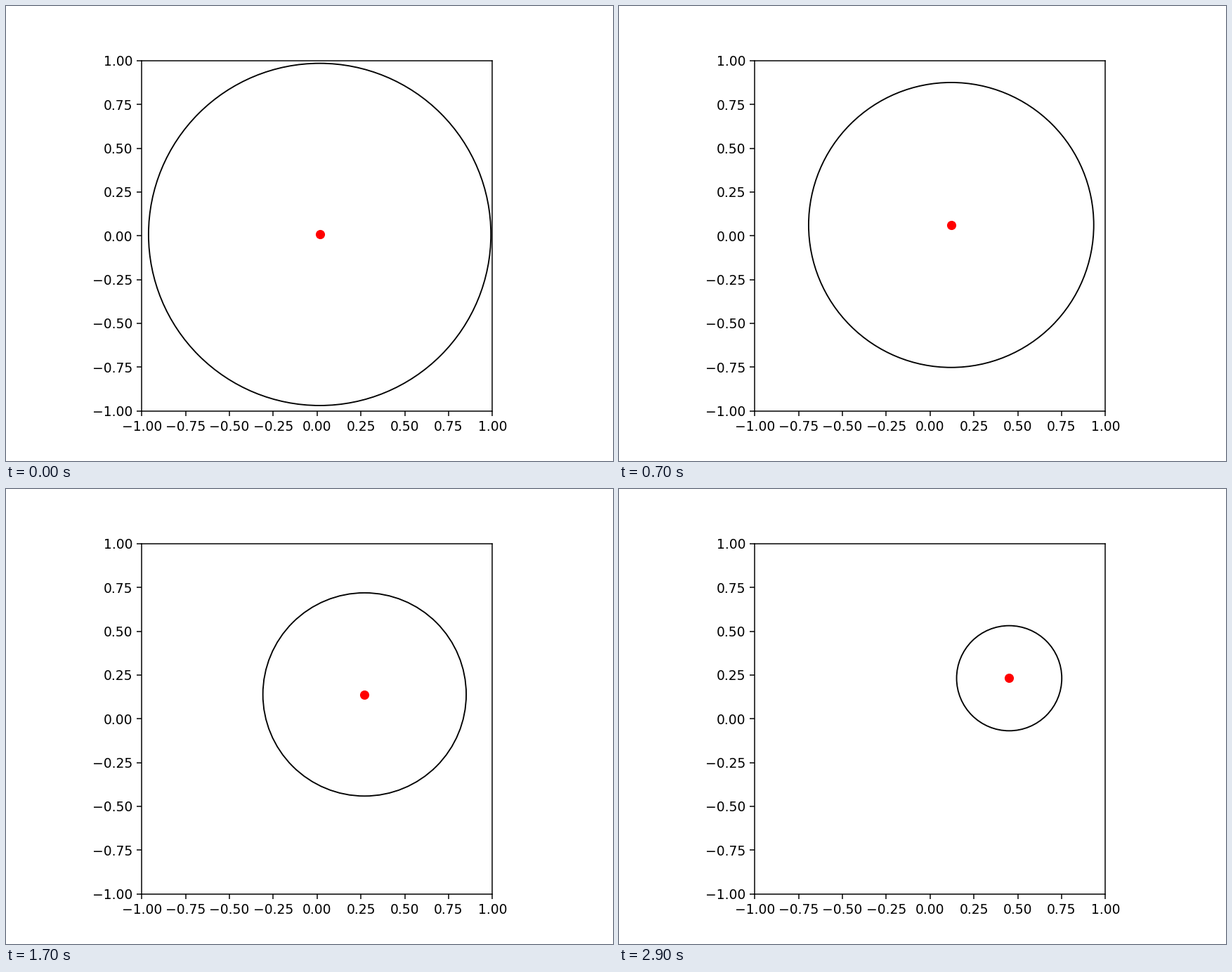
Recreate the animation shown at these times as a matplotlib script. Size 864 by 648 pixels, loop 3 s.

```python
import matplotlib.pyplot as plt
from matplotlib.animation import FuncAnimation
from matplotlib.patches import Circle

FRAMES = 30
INTERVAL = 100
END_X, END_Y = 0.4513, 0.2315
END_RADIUS = 0.3

fig, ax = plt.subplots(figsize=(6.4, 4.8), dpi=135)
ax.set_xlim(-1, 1)
ax.set_ylim(-1, 1)
ax.set_aspect("equal")

ring = ax.add_patch(Circle((0, 0), 1, fill=False, edgecolor="black", linewidth=1))
dot, = ax.plot([], [], "ro")


def update(frame):
    """Shrink the unit circle linearly towards its end position."""
    t = (frame + 1) / FRAMES
    x, y = END_X * t, END_Y * t
    ring.set_center((x, y))
    ring.set_radius(1 + (END_RADIUS - 1) * t)
    dot.set_data([x], [y])
    return ring, dot


anim = FuncAnimation(fig, update, frames=FRAMES, interval=INTERVAL,
                     init_func=lambda: update(0), repeat=True, repeat_delay=0)

plt.show()
```
